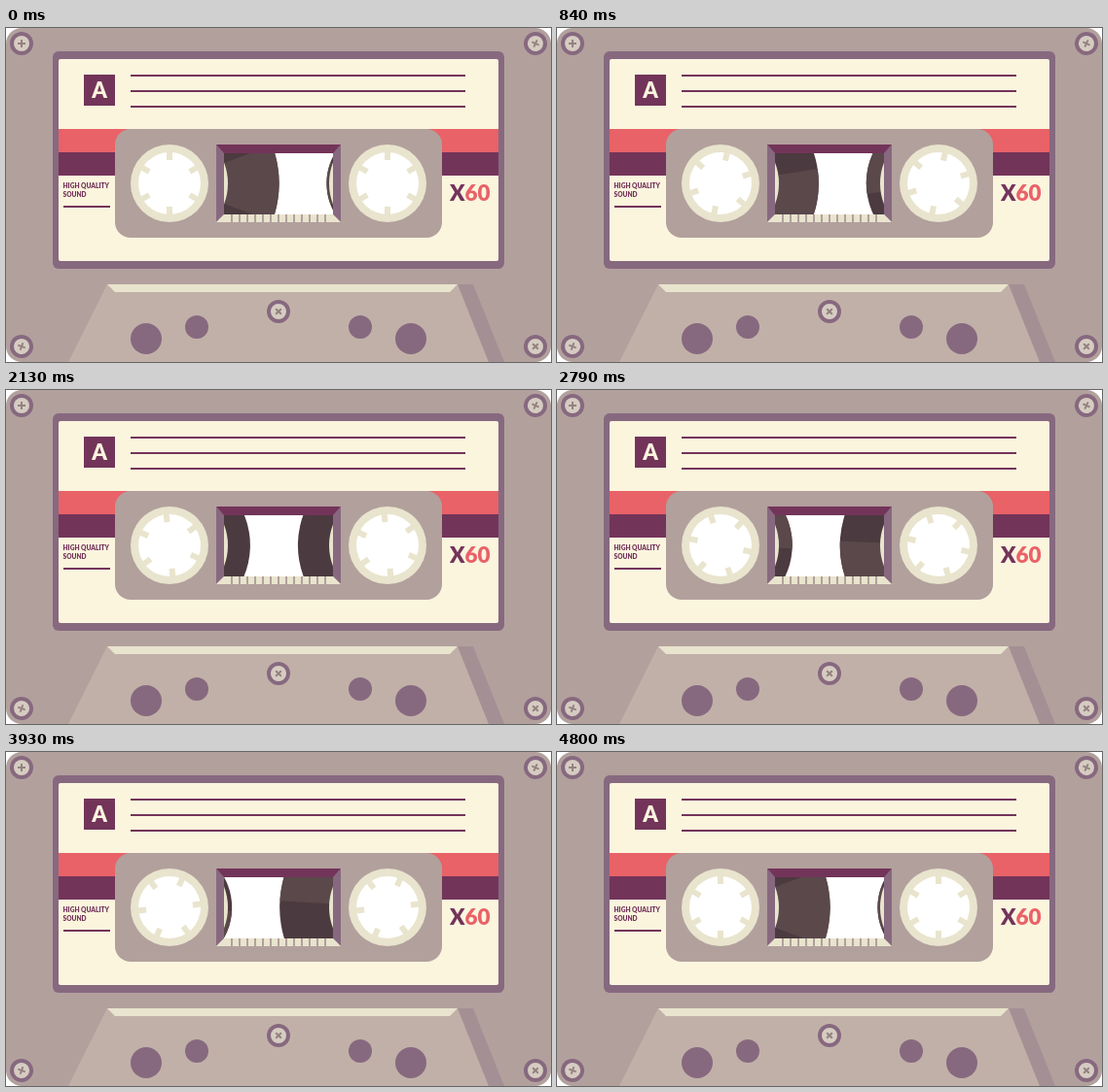
An HTML page for the animation above (5100 ms loop, 560x344 px).

```html
<!DOCTYPE html>
<html lang="en">
<head>
<meta charset="utf-8">
<title>Cassette</title>
<style>
  html, body { margin: 0; width: 100%; height: 100%; overflow: hidden; background: #fff; }
  svg { display: block; width: 560px; height: 344px; }
  text { font-family: Lato, "Open Sans", sans-serif; font-weight: 900; }
  .body { fill: #b2a09d; }
  .mauve { fill: #87697f; }
  .plum { fill: #73345a; }
  .red { fill: #e96268; }
  .paper { fill: #fbf5de; }
  .cream { fill: #e9e4cd; }
  .rule { stroke: #73345a; stroke-width: 2; fill: none; }
  .small { font-size: 6.6px; }
</style>
</head>
<body>
<svg viewBox="0 0 560 344">
  <defs>
    <clipPath id="shell"><rect width="560" height="344" rx="16"/></clipPath>
    <clipPath id="window"><rect x="224" y="128" width="112" height="64"/></clipPath>
    <g id="tape">
      <circle r="1" fill="#4b3a3f"/>
      <path d="M0 0L.937-.35A1 1 0 0 1 .937.35L-.937-.35A1 1 0 0 0-.937.35Z" fill="#5a484b"/>
    </g>
    <g id="teeth" class="cream">
      <path id="pair" d="M-3-33h6v9h-6zM-3 24h6v9h-6z"/>
      <use href="#pair" transform="rotate(60)"/>
      <use href="#pair" transform="rotate(120)"/>
    </g>
    <g id="screw">
      <circle r="12" class="mauve"/>
      <circle r="8" fill="#d6ccc2"/>
      <path d="M-4 0H4M0-4V4" stroke="#94827f" stroke-width="2"/>
    </g>
  </defs>

  <g clip-path="url(#shell)">
    <rect class="body" width="560" height="344"/>

    <!-- label -->
    <rect class="mauve" x="48" y="24" width="464" height="224" rx="6"/>
    <rect class="paper" x="54" y="32" width="452" height="208" rx="2"/>
    <rect class="red" x="54" y="104" width="452" height="24"/>
    <rect class="plum" x="54" y="128" width="452" height="24"/>
    <rect class="plum" x="80" y="48" width="32" height="32"/>
    <text class="paper" x="96" y="71.5" font-size="22" text-anchor="middle">A</text>
    <path class="rule" d="M128 49H472M128 65H472M128 81H472M59 184H107"/>
    <text class="plum small" x="58.5" y="165">HIGH QUALITY</text>
    <text class="plum small" x="58.5" y="174">SOUND</text>
    <text class="plum" x="456" y="177.5" font-size="22.5">X<tspan class="red">60</tspan></text>
    <rect class="body" x="112" y="104" width="336" height="112" rx="16"/>

    <!-- window -->
    <rect x="224" y="128" width="112" height="64" fill="#fff"/>
    <g clip-path="url(#window)">
      <use href="#tape" id="tapeL"/>
      <use href="#tape" id="tapeR"/>
      <circle class="cream" cx="168" cy="160" r="60"/>
      <circle class="cream" cx="392" cy="160" r="60"/>
    </g>
    <path class="mauve" d="M216 120l8 8v64l-8 8zM344 120l-8 8v64l8 8z"/>
    <path class="plum" d="M216 120H344l-8 9H224z"/>
    <path class="cream" d="M216 200H344l-8-8H224z"/>
    <path d="M231 196H330" stroke="#b2a09d" stroke-width="8" stroke-dasharray="2 6"/>

    <!-- hubs -->
    <g class="cream">
      <circle cx="168" cy="160" r="40"/>
      <circle cx="392" cy="160" r="40"/>
    </g>
    <g fill="#fff">
      <circle cx="168" cy="160" r="32"/>
      <circle cx="392" cy="160" r="32"/>
    </g>
    <use href="#teeth" id="teethL"/>
    <use href="#teeth" id="teethR"/>

    <!-- lower panel -->
    <path d="M104 264H464L496 344H64z" fill="#c1b0a8"/>
    <path d="M464 264h16l32 80h-16z" fill="#a49094"/>
    <path class="cream" d="M104 264H464l-8 8H112z"/>
    <g class="mauve">
      <circle cx="144" cy="320" r="16"/>
      <circle cx="416" cy="320" r="16"/>
      <circle cx="196" cy="308" r="12"/>
      <circle cx="364" cy="308" r="12"/>
    </g>

    <use href="#screw" transform="translate(16 16)"/>
    <use href="#screw" transform="translate(544 16) rotate(25)"/>
    <use href="#screw" transform="translate(16 328) rotate(20)"/>
    <use href="#screw" transform="translate(544 328) rotate(45)"/>
    <use href="#screw" transform="translate(280 292) rotate(45)"/>
  </g>
</svg>
<script>
  const LOOP = 5100, STEP = 30;
  const PLAY_END = 3600, REWIND_START = 3900, REWIND_END = 4800;
  const FULL = 112.5, EMPTY = 62.5, TURN = -720;
  const $ = id => document.getElementById(id);

  const reels = [
    { x: 168, from: FULL, to: EMPTY, tape: $('tapeL'), teeth: $('teethL') },
    { x: 392, from: EMPTY, to: FULL, tape: $('tapeR'), teeth: $('teethR') }
  ];

  // Share of the tape wound onto the right reel
  function progress(t) {
    if (t < PLAY_END) return t / PLAY_END;
    if (t < REWIND_START) return 1;
    return Math.max(0, (REWIND_END - t) / (REWIND_END - REWIND_START));
  }

  function draw(time) {
    const t = Math.floor((time % LOOP) / STEP) * STEP;
    const p = progress(t);
    for (const { x, from, to, tape, teeth } of reels) {
      const spin = `translate(${x} 160) rotate(${TURN * p})`;
      teeth.setAttribute('transform', spin);
      tape.setAttribute('transform', `${spin} scale(${from + (to - from) * p})`);
    }
  }

  const start = performance.now();
  function tick() {
    draw(performance.now() - start);
    requestAnimationFrame(tick);
  }
  tick();
</script>
</body>
</html>
```
